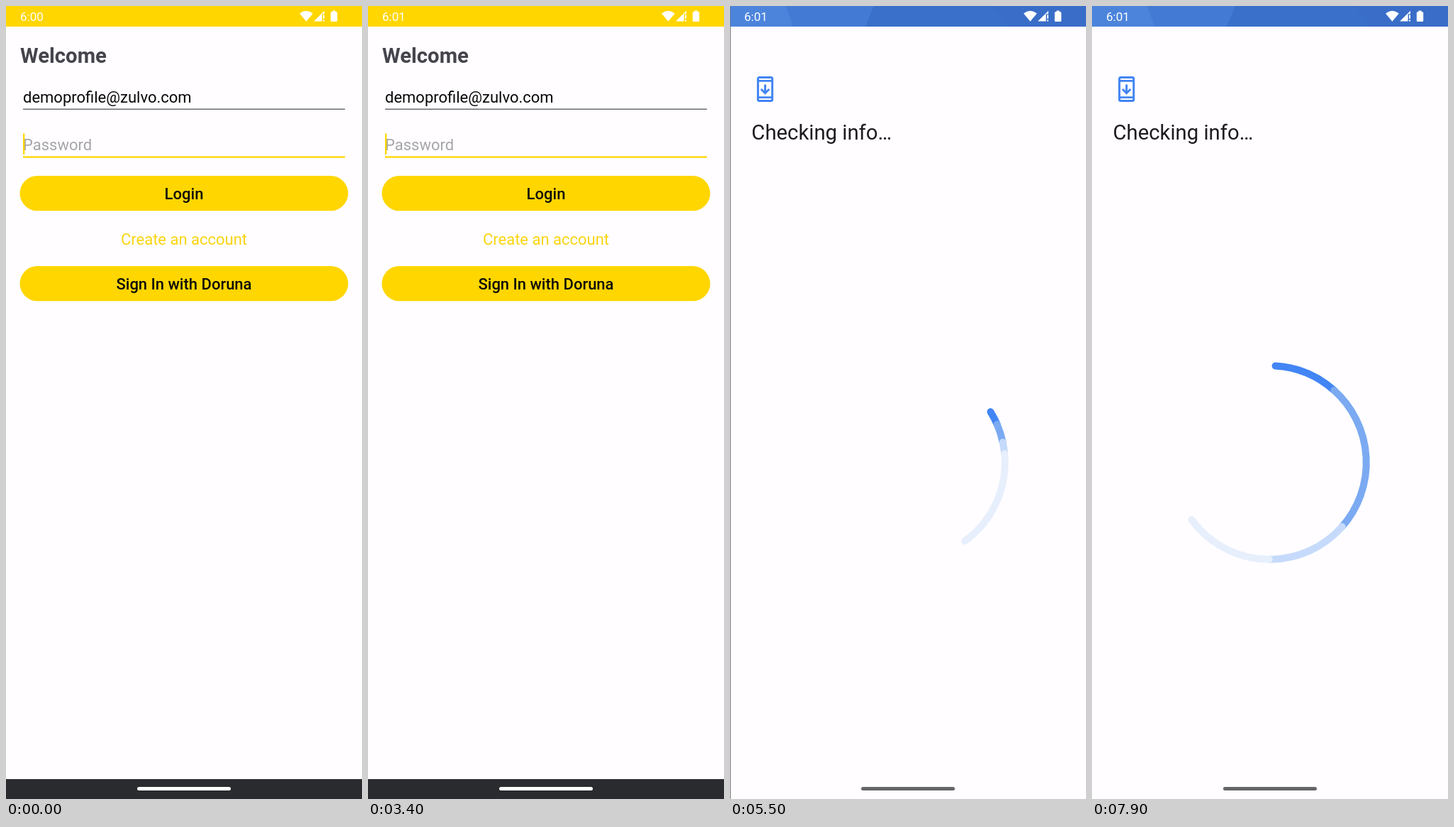
An HTML page for the animation above (8000 ms loop, 502 by 1116 pixels).

```html
<!DOCTYPE html>
<html lang="en">
<head>
<meta charset="utf-8">
<title>Sign in flow</title>
<style>
  html, body { margin: 0; width: 100%; height: 100%; overflow: hidden; background: #fffdff; }
  svg { display: block; width: 502px; height: 1116px; }
  text { font-family: Roboto, "Noto Sans", sans-serif; font-size: 22px; }
  .heading { font-size: 29.3px; }
  .clock { font-size: 17.1px; fill: #fff; }
  .button { font-weight: 500; text-anchor: middle; fill: #0c0b08; }
  .arc { fill: none; stroke-width: 10; stroke-linecap: round; }
</style>
</head>
<body>
<svg viewBox="0 0 502 1116">
  <g id="form">
    <rect width="502" height="1116" fill="#fffdff"/>
    <rect width="502" height="29" fill="#ffd600"/>
    <text class="heading" x="20" y="80" font-weight="700" fill="#45434b">Welcome</text>
    <text x="24" y="136" fill="#080808">demoprofile@zulvo.com</text>
    <rect x="24" y="144.6" width="454" height="1.2" fill="#48474a"/>
    <text x="24" y="203" fill="#a6a5a8">Password</text>
    <rect x="24" y="211.4" width="454" height="2.3" fill="#ffd600"/>
    <rect x="24" y="179.5" width="2.3" height="29.5" fill="#ffd600"/>
    <rect x="19.5" y="239" width="463" height="49.3" rx="24.6" fill="#ffd600"/>
    <text class="button" x="251" y="272">Login</text>
    <text x="251" y="336" text-anchor="middle" fill="#fad411">Create an account</text>
    <rect x="19.5" y="366" width="463" height="49.3" rx="24.6" fill="#ffd600"/>
    <text class="button" x="251" y="399">Sign In with Doruna</text>
    <rect y="1088" width="502" height="28" fill="#2a2b2e"/>
  </g>

  <g id="dim">
    <rect y="29" width="502" height="1058" fill="#000" opacity=".6"/>
    <path d="M0 0H502V29H0ZM0 1087H502V1116H0Z"/>
  </g>
  <rect id="cover" width="502" height="1116" fill="#666"/>

  <g id="page">
    <rect width="502" height="1116" fill="#fffdff"/>
    <rect width="502" height="29" fill="#3b70ca"/>
    <path d="M0 0H202L190 29H0Z" fill="#437bd4"/>
    <path d="M0 0H78L88 29H0Z" fill="#4c84dc"/>
    <path d="M372 0H502V29H390Z" fill="#396dc7"/>
    <g fill="none" stroke="#4285f4" stroke-width="3">
      <rect x="38.6" y="100.6" width="20.2" height="32.8" rx="2"/>
      <path d="M38 105.4H60M38 128.6H60" stroke-width="2.6"/>
      <path d="M48.7 110.5V122M43 117L48.7 122.7L54.4 117"/>
    </g>
    <text class="heading" x="29.5" y="187.5" fill="#1d1b1f">Checking info…</text>
    <path class="arc" stroke="#4285f4"/>
    <path class="arc" stroke="#7baaf2"/>
    <path class="arc" stroke="#c6dafb"/>
    <path class="arc" stroke="#e7effd"/>
  </g>
  <rect id="blank" width="502" height="1116" fill="#fffdff"/>

  <text class="clock" id="clock" x="20" y="21"></text>
  <g fill="#fff">
    <path d="M414 10.4Q423.3 3.2 432.8 10.4L423.4 21.8Z"/>
    <path d="M434 21.6L449 6.8V11.2H445.6V21.6ZM447 12.6H449V17.8H447ZM447 19.4H449V21.6H447Z"/>
    <path d="M460.4 6.6H464.6V8.2H466Q467.2 8.2 467.2 9.4V20.8Q467.2 22 466 22H459Q457.8 22 457.8 20.8V9.4Q457.8 8.2 459 8.2H460.4Z"/>
  </g>
  <rect id="handle" x="185" y="1099" width="132" height="5" rx="2.5"/>
</svg>
<script>
const LOOP = 8000, STEP = 100;
const FORM_BAR = "#fff", PAGE_BAR = "#66656a";
const $ = id => document.getElementById(id);
const arcs = document.querySelectorAll(".arc");
const clamp = v => Math.min(1, Math.max(0, v));

// Two joined Béziers: a quick start with a very slow finish.
const CURVE = [
  [[0, 0], [.05, 0], [.1333, .06], [.1667, .4]],
  [[.1667, .4], [.2083, .82], [.25, 1], [1, 1]]
];
function bezier(seg, u, axis) {
  const v = 1 - u, p = seg.map(point => point[axis]);
  return p[0] * v ** 3 + 3 * p[1] * v * v * u + 3 * p[2] * v * u * u + p[3] * u ** 3;
}
function slowOut(x) {
  const seg = CURVE[x < .1667 ? 0 : 1];
  let lo = 0, hi = 1;
  for (let i = 0; i < 24; i++) {
    const mid = (lo + hi) / 2;
    if (bezier(seg, mid, 0) < x) lo = mid; else hi = mid;
  }
  return bezier(seg, lo, 1);
}

// A screen opens from 10% to the right, with a short delayed fade.
function open(el, ms) {
  const shift = 50.2 * (1 - slowOut(clamp(ms / 450)));
  el.setAttribute("transform", `translate(${shift.toFixed(2)} 0)`);
  el.setAttribute("opacity", clamp((ms - 50) / 83));
}

// Progress of tail, three joints and head: [at 200 ms, at 1200 ms].
const ENDS = [[.104, .503], [.112, .537], [.112, .619], [.112, .667], [.188, .725]];
function spot(deg) {
  const a = deg * Math.PI / 180;
  return `${(250.5 + 136.3 * Math.sin(a)).toFixed(2)} ${(642.5 - 136.3 * Math.cos(a)).toFixed(2)}`;
}
function spin(ms) {
  const deg = ENDS.map(([a, b]) => {
    const p = clamp(a + (b - a) * (ms - 200) / 1000);
    return 360 * (1 - Math.cos(Math.PI * p));
  });
  arcs.forEach((arc, i) => {
    const from = deg[i], to = Math.max(deg[i + 1], from + .05);
    arc.setAttribute("d", `M${spot(from)}A136.3 136.3 0 ${to - from > 180 ? 1 : 0} 1 ${spot(to)}`);
  });
}

function render(t) {
  const again = t >= 6800;
  $("clock").textContent = t < 1000 ? "6:00" : "6:01";
  $("dim").setAttribute("opacity", clamp((t - 3400) / 200));
  open($("cover"), t - 4900);
  open($("page"), t - (again ? 6800 : 5200));
  spin(t - (again ? 6700 : 5100));

  const blank = $("blank"), page = $("page");
  open(blank, t - 5800);
  // On the second visit the page opens over the blank screen.
  if (again) page.before(blank); else page.after(blank);
  $("handle").setAttribute("fill", t < 5400 ? FORM_BAR : PAGE_BAR);
}

const start = performance.now();
function tick(now) {
  const t = Math.max(0, now - start) % LOOP;
  render(Math.floor(t / STEP) * STEP);
  requestAnimationFrame(tick);
}
render(0);
requestAnimationFrame(tick);
</script>
</body>
</html>
```
